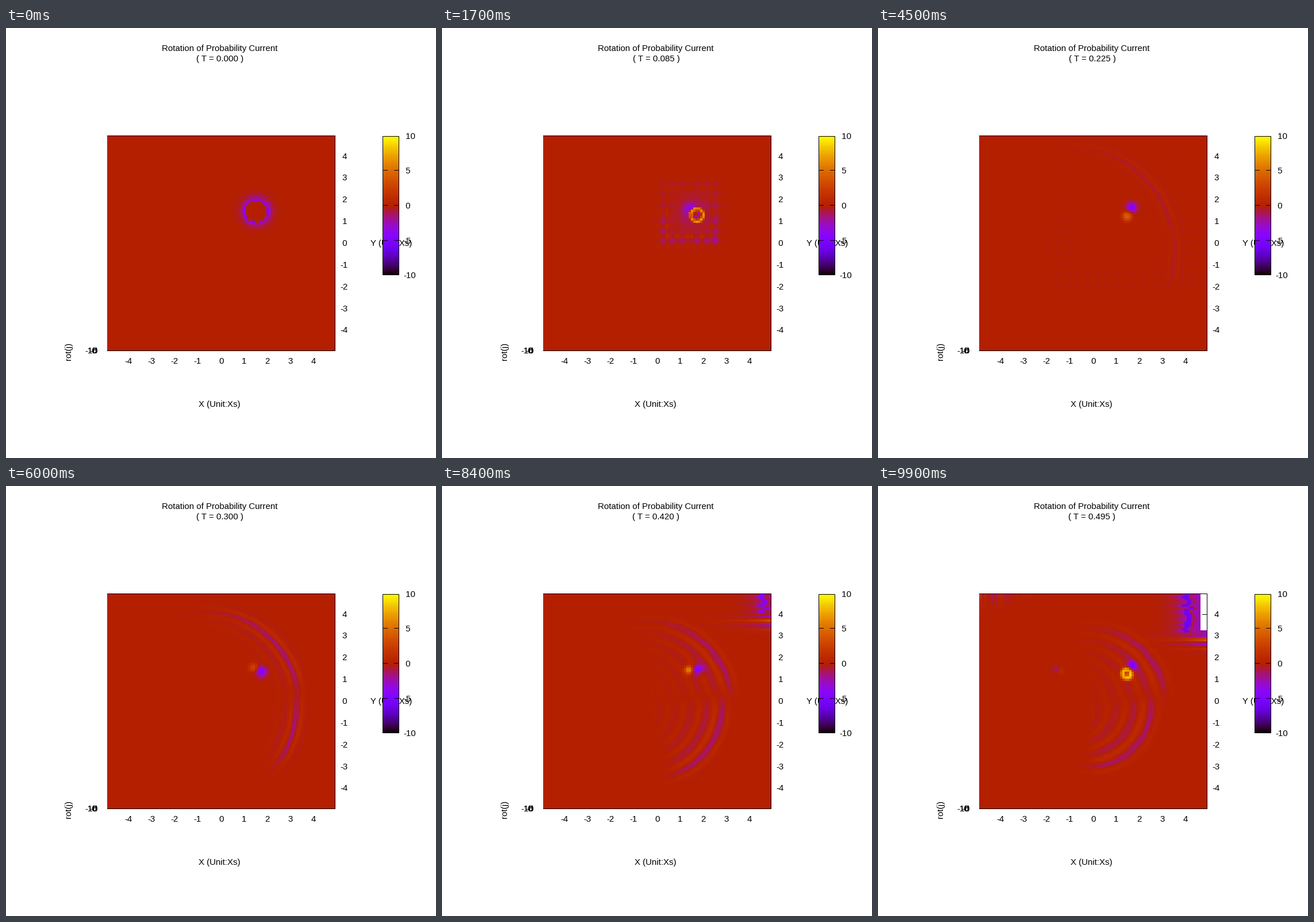
These frames come from a looping animation (748 px wide and 748 px high, 10000 ms). A matplotlib script:

```python
import numpy as np
import matplotlib.pyplot as plt
from matplotlib.animation import FuncAnimation
from matplotlib.colors import ListedColormap
from matplotlib.patches import Rectangle

SIZE, DPI, FRAMES, N = 748, 64, 100, 99
PX = 72 / DPI
LEFT, RIGHT, TOP, BOTTOM = 176, 573, 187, 562
SX, SY = 40.1, 37.85

plt.rcParams["font.family"] = "Liberation Sans"

# r = sqrt(p), g = p^3, b = sin(2 pi p); odd length keeps zero inside one level
p = np.linspace(0, 1, 257)
palette = ListedColormap(np.c_[np.sqrt(p), p**3, np.clip(np.sin(2 * np.pi * p), 0, 1)])
palette.set_bad((1, 1, 1, 0))

# cell indices and cell centres in stage pixels
J, I = np.mgrid[:N, :N]
D = N - 1 - I
X = LEFT + (RIGHT - LEFT) * (I + 0.5) / N
Y = TOP + (BOTTOM - TOP) * (J + 0.5) / N

rng = np.random.default_rng(7)
row_jag = rng.uniform(-1.3, 1.3, (N, 1))
row_amp = rng.uniform(0.35, 1, (N, 1))
col_amp = rng.uniform(-4.5, 2.5, (1, N))


def ramp(t, a, b):
    return np.clip((t - a) / (b - a), 0, 1)


def sigmoid(z):
    return 1 / (1 + np.exp(-np.clip(z, -50, 50)))


def blob(x, y, amp, w, radius=0):
    return amp * np.exp(-((np.hypot(X - x, Y - y) - radius) / w) ** 2)


def halo(t):
    """Purple ring that closes in and fades."""
    r = np.hypot((X - 435 - 30 * t) / SX, (Y - 318.5 - 30 * t) / SY)
    hole = max(0.49 - 3.4 * t, 0.1)
    amp = -4.9 * (1 - ramp(t, 0, 0.18))
    return np.where(r < hole, 0, amp * np.exp(-(r - hole) / (0.13 + 2.4 * min(t, 0.1))))


def dipole(t):
    """Negative spot and positive ring turning about a common centre."""
    a = np.radians(140 - 170 * ramp(t, 0.16, 0.3) + 85 * ramp(t, 0.38, 0.495))
    dx, dy = 8 * np.cos(a), -8 * np.sin(a)
    radius = 13 * (1 - ramp(t, 0.05, 0.27)) + 7 * ramp(t, 0.46, 0.495)
    swing = 5.7 + 2.6 * np.cos(2 * np.pi * (t - 0.085) / 0.4)
    return (blob(437 + dx, 319 + dy, -5.5 * ramp(t, 0.03, 0.16), 8.5)
            + blob(437 - dx, 320 - dy, swing * ramp(t, 0.025, 0.085), 7 - 0.35 * radius, radius))


def lattice(t):
    """Dotted front that spreads as a square."""
    amp = 1.4 * ramp(t, 0.02, 0.06) * np.exp(-((t - 0.085) / 0.09) ** 2)
    s = 500 * t + 4
    u, v = X - 430, (Y - 321) / 1.08
    edge = np.maximum(abs(u), abs(v)) / s
    env = np.exp(-((edge - 0.92) / 0.24) ** 2) * (0.35 + 0.65 * sigmoid(v / 8))
    cu, cv = (np.cos(2 * np.pi * (abs(z) - s) / 17) for z in (u, v))
    return -amp * env * (0.5 * (cu + cv) + 0.25) + blob(426 + s, 317 + 1.08 * s, -amp, 6)


def arcs(t):
    """Two curved wave trains, above and below the axis."""
    a = t - 0.3
    dx, dy = X - 345 - 115 * a, 384 - 20 * a - Y
    rho = 165 - 165 * a - np.hypot(dx, dy)
    ang = np.degrees(np.arctan2(dy, dx))
    wave, depth = 21 + 50 * a, max(14 + 250 * a, 8)
    up, low = 70, max(34 + 260 * a, 4)
    trains = ((0, sigmoid((ang - 13) / 4) * sigmoid((up - ang) / 11)),
              (5 + 100 * a, sigmoid((3 - ang) / 4) * sigmoid((low + ang) / 5)))
    f = 0
    for shift, share in trains:
        q = rho - shift
        squeeze = 1 - 0.3 * np.clip(abs(ang) / 90, 0, 1) ** 2
        env = np.where(q < 0, np.exp(-(q / 13) ** 2), np.exp(-np.maximum(q, 0) / depth))
        f = f - share * env * np.cos(2 * np.pi * q / (wave * squeeze))
    return (1.7 - 2.2 * a) * ramp(t, 0.19, 0.28) * f


def corners(t):
    """Ragged spill from the top right edge, wrapping to the top left."""
    grow = ramp(t, 0.37, 0.44)
    gap = D - (t - 0.375) * 68 - row_jag
    limit = 4 + 115 * (t - 0.38)
    rows = J < limit
    body = np.where(gap < -1.2, -2.4 * (1 - 0.6 * np.exp(-(gap + 2.2) ** 2)),
                    np.where(gap < 1, -6, -4.5 * row_amp * np.exp(-np.maximum(gap, 0) / 3.5)))
    k = J - limit - 3.5
    streaks = 4.5 * np.cos(np.pi * k / 2.2) * np.exp(-(k / 4) ** 2 - D / 8)
    reach = 0.5 + 200 * max(t - 0.455, 0)
    wrap = ramp(t, 0.43, 0.46) * col_amp * np.exp(-J / 2.5 - I / reach)
    return grow * np.where(rows, body, streaks) + wrap


def field(t):
    echo = ramp(t, 0.46, 0.495)
    f = halo(t) + dipole(t) + lattice(t) + arcs(t) + corners(t)
    f += blob(310, 319, -1.3 * echo, 6) + blob(318, 322, echo, 5)
    f = np.clip(f, -10, 10)
    # cells beyond the range stay empty
    f[(D < (t - 0.46) * 62) & (J < 17) & (t > 0.472)] = np.nan
    return f


fig = plt.figure(figsize=(SIZE / DPI, SIZE / DPI), dpi=DPI, facecolor="white")
ax = fig.add_axes((0, 0, 1, 1))


def text(x, y, s, ha="center", va="baseline", zorder=5, **kw):
    return ax.text(x, y, s, ha=ha, va=va, fontsize=15 * PX, zorder=zorder, **kw)


def line(x0, y0, x1, y1, zorder=4):
    ax.plot([x0, x1], [y0, y1], color="black", lw=PX, snap=False,
            solid_capstyle="butt", zorder=zorder)


def picture(data, box, zorder):
    return ax.imshow(data, cmap=palette, vmin=-10, vmax=10, extent=box, aspect="auto",
                     interpolation="nearest", zorder=zorder)


def padded(v):
    return f"{v}" if v < 0 else f" {v}"


surface = picture(field(0), (LEFT, RIGHT, BOTTOM, TOP), 2)
line(LEFT, 187.5, RIGHT, 187.5)
line(LEFT, 561.5, RIGHT, 561.5)
line(572.5, TOP, 572.5, BOTTOM)

for v in range(-4, 5):
    text((373.2 if v < 0 else 374.4) + 40 * v, 584, str(v))
    y = 374 - SY * v
    text(581, y + 5, padded(v), ha="left")
    line(564, round(y) + 0.5, 572, round(y) + 0.5, zorder=1)

picture(np.linspace(10, -10, 242)[:, None], (656, 683, 430, 188), 3)
ax.add_patch(Rectangle((655.5, 188.5), 28, 241, fill=False, ec="black", lw=PX,
                       snap=False, zorder=4))
for v in range(-10, 11, 5):
    text(159, 566, str(v), ha="right")
    y = round(309 - 12.1 * v)
    text(691.5, y + 5, padded(v), ha="left")
    if abs(v) < 10:
        line(656, y - 0.5, 664, y - 0.5)
        line(675, y - 0.5, 683, y - 0.5)

text(372, 40, "Rotation of Probability Current")
clock = text(372.5, 58, "")
text(371.5, 659, "X (Unit:Xs)")
text(670, 379, "Y (Unit:Xs)", zorder=1)
text(109.5, 562, "rot(j)", rotation=90, va="center")

ax.set_xlim(0, SIZE)
ax.set_ylim(SIZE, 0)
ax.axis("off")


def update(k):
    t = 0.005 * k
    surface.set_data(field(t))
    clock.set_text(f"( T = {t:.3f} )")
    return surface, clock


anim = FuncAnimation(fig, update, frames=FRAMES, interval=100, repeat=True, repeat_delay=0)
plt.show()
```
